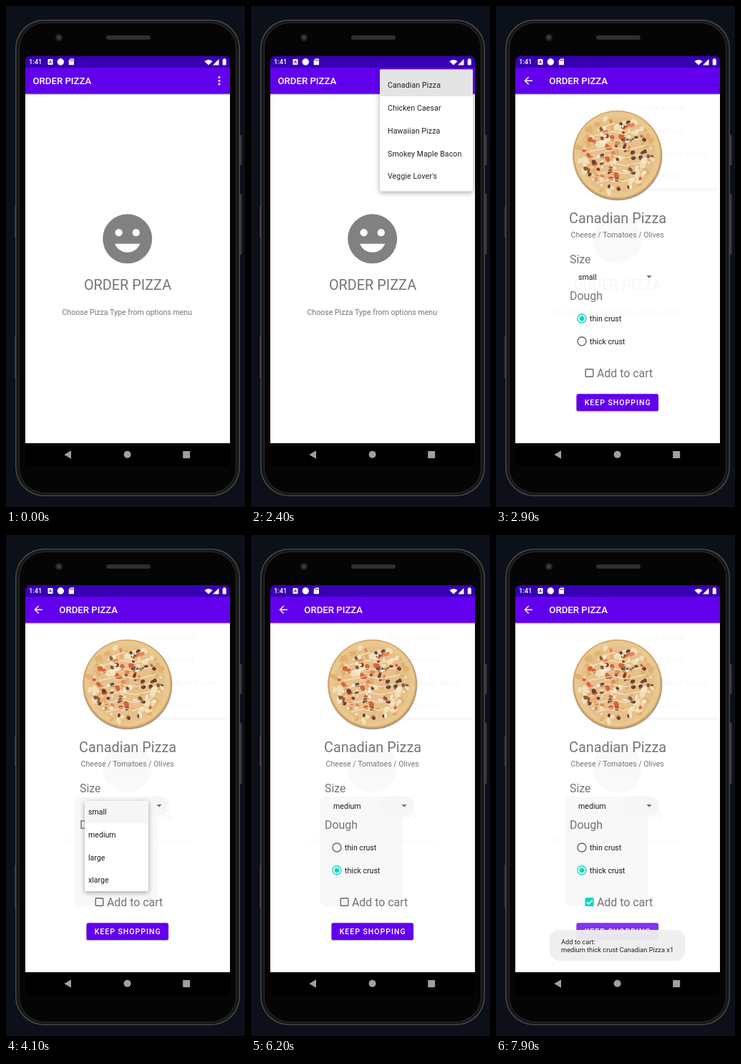
Recreate the animation shown at these times as an HTML page with a canvas. Size 334 by 699 pixels, loop 8 s.

```html
<!DOCTYPE html>
<html lang="en">
<head>
<meta charset="utf-8">
<title>Order Pizza</title>
<style>
html, body { margin: 0; width: 100%; height: 100%; overflow: hidden; background: #0c1019; }
canvas { display: block; width: 334px; height: 699px; font-family: Roboto, sans-serif; }
</style>
</head>
<body>
<canvas id="stage"></canvas>
<script>
const W = 334, H = 699, LOOP = 8000, TAU = Math.PI * 2;
const PURPLE = '#6200ee', DARK = '#3700b3', TEAL = '#10d6bf', GREY = '#757575';
const stage = document.getElementById('stage');
const c = stage.getContext('2d');
const dpr = window.devicePixelRatio || 1;
stage.width = W * dpr;
stage.height = H * dpr;

const seg = (t, a, b) => Math.min(1, Math.max(0, (t - a) / (b - a)));
const easeOut = p => 1 - (1 - p) * (1 - p);

function rect(x, y, w, h, color) {
  c.fillStyle = color;
  c.fillRect(x, y, w, h);
}

function round(x, y, w, h, r, color) {
  c.beginPath();
  c.roundRect(x, y, w, h, r);
  c.fillStyle = color;
  c.fill();
}

function disc(x, y, r, color) {
  c.beginPath();
  c.arc(x, y, r, 0, TAU);
  c.fillStyle = color;
  c.fill();
}

function poly(points, color) {
  c.beginPath();
  points.forEach(([x, y]) => c.lineTo(x, y));
  c.closePath();
  c.fillStyle = color;
  c.fill();
}

function line(points, color, width) {
  c.beginPath();
  points.forEach(([x, y]) => c.lineTo(x, y));
  c.strokeStyle = color;
  c.lineWidth = width;
  c.stroke();
}

// y is the middle of the capital letters
function text(str, x, y, size, color, { weight = 400, align = 'left', gap = 0 } = {}) {
  c.font = `${weight} ${size}px Roboto, sans-serif`;
  c.letterSpacing = gap + 'px';
  c.textAlign = align;
  c.fillStyle = color;
  c.fillText(str, x, y + size * 0.355);
}

function layer(alpha, draw) {
  if (alpha <= 0) return;
  c.save();
  c.globalAlpha *= alpha;
  draw();
  c.restore();
}

function zoom(scale, draw) {
  c.save();
  c.translate(170, 356);
  c.scale(scale, scale);
  c.translate(-170, -356);
  draw();
  c.restore();
}

function random(seed) {
  return () => {
    seed = (seed * 16807) % 2147483647;
    return seed / 2147483647;
  };
}

function phone() {
  rect(0, 0, W, H, '#0c1019');
  [[12, 280, 43], [12, 460, 60], [326, 180, 42], [326, 262, 85]].forEach(([x, y, h]) => {
    round(x, y, 3.5, h, 1, '#3b3b3d');
  });
  round(13, 19, 314, 665, 40, '#454547');
  round(14.5, 20.5, 311, 662, 39, '#161617');
  round(18, 23, 304, 657, 36, '#2b2b2c');
  round(19, 24, 302, 655, 35, '#050505');
  round(140, 41, 62, 6, 3, '#2f2f30');
  disc(74, 44, 5, '#232326');
  disc(74, 44, 2.4, '#3c3f48');
}

function frame(title, titleX) {
  rect(27, 70, 286, 16, DARK);
  rect(27, 86, 286, 524, '#fff');
  rect(27, 122, 286, 2, '#d9d9d9');
  rect(27, 86, 286, 36.7, PURPLE);
  rect(27, 610, 286, 32, '#000');
  text(title, titleX, 104.5, 13.2, '#fff', { weight: 500 });
}

function face(color) {
  c.save();
  c.translate(169.7, 324.8);
  c.scale(3.45, 3.45);
  disc(0, 0, 10, color);
  disc(-3.5, -2.5, 1.5, '#fff');
  disc(3.5, -2.5, 1.5, '#fff');
  c.fill(new Path2D('M0 5.5c2.33 0 4.31-1.46 5.11-3.5h-10.22c.8 2.04 2.78 3.5 5.11 3.5z'));
  c.restore();
}

function home() {
  frame('ORDER PIZZA', 37.5);
  [99.5, 104.3, 109].forEach(y => disc(298, y, 1.5, '#fff'));
  face('#818181');
  text('ORDER PIZZA', 170, 388.5, 19.86, GREY, { align: 'center' });
  text('Choose Pizza Type from options menu', 169.2, 427.3, 10.6, GREY, { align: 'center' });
}

const PIZZAS = ['Canadian Pizza', 'Chicken Caesar', 'Hawaiian Pizza', 'Smokey Maple Bacon', "Veggie Lover's"];
const SIZES = ['small', 'medium', 'large', 'xlarge'];

function card(x, y, w, h) {
  c.save();
  c.shadowColor = 'rgba(0,0,0,.35)';
  c.shadowBlur = 7 * dpr;
  c.shadowOffsetY = 2 * dpr;
  round(x, y, w, h, 2, '#fff');
  c.restore();
}

function menu(p, pressed) {
  const w = 130 * p, h = 170 * p;
  card(310 - w, 88.5, w, h);
  c.save();
  c.beginPath();
  c.rect(310 - w, 88.5, w, h);
  c.clip();
  rect(180, 88.5, 130, 37.5, pressed ? '#e4e4e4' : '#f6f6f6');
  PIZZAS.forEach((name, i) => text(name, 191, 110.5 + i * 31.8, 10.6, '#222', { gap: 0.1 }));
  c.restore();
}

function pizza() {
  const rnd = random(77);
  const spot = limit => {
    const a = rnd() * TAU, r = Math.sqrt(rnd()) * limit;
    return [Math.cos(a) * r, Math.sin(a) * r];
  };
  const blob = (limit, min, max, color) => {
    const [x, y] = spot(limit);
    c.beginPath();
    c.ellipse(x, y, min + rnd() * max, min + rnd() * max * 0.6, rnd() * 3, 0, TAU);
    c.fillStyle = color;
    c.fill();
  };
  c.save();
  c.translate(169.5, 207.8);
  disc(0.3, 1, 62.5, '#9b9290');
  disc(0, 0, 62, '#d7a362');
  disc(0, -0.5, 60, '#e9c88f');
  disc(0, 0, 53, '#e6c08a');
  for (let i = 0; i < 70; i++) blob(55, 2, 4, i % 2 ? '#f2dfb6' : '#e2b06f');
  for (let i = 0; i < 34; i++) blob(48, 1.8, 3, i % 3 ? '#d8623c' : '#e58757');
  for (let i = 0; i < 46; i++) blob(49, 1.6, 2.4, i % 3 ? '#6b4232' : '#8b5a40');
  for (let i = 0; i < 30; i++) blob(50, 1.2, 2.5, '#f5e7cc');
  c.lineCap = 'round';
  for (let i = 0; i < 8; i++) {
    const y = -42 + i * 11, half = Math.sqrt(50 * 50 - y * y) * 0.8;
    line([[-half, y + 4], [-half * 0.2, y - 2], [half * 0.3, y + 2], [half, y - 4]], 'rgba(255,248,235,.65)', 1.3);
  }
  c.restore();
}

// faint remains of the page before
function remains() {
  layer(0.03, () => {
    PIZZAS.slice(1).forEach((name, i) => text(name, 191, 142.3 + i * 31.8, 10.6, '#000', { weight: 500 }));
    text('ORDER PIZZA', 170, 388.5, 19.86, '#000', { align: 'center', weight: 500 });
    text('Choose Pizza Type from options menu', 169.2, 427.3, 10.6, '#000', { align: 'center' });
    rect(180, 254, 130, 4, '#000');
  });
  layer(0.025, () => face('#000'));
}

function radio(y, on, label) {
  c.beginPath();
  c.arc(120, y, 6, 0, TAU);
  c.strokeStyle = on > 0.5 ? TEAL : '#666';
  c.lineWidth = 1.4;
  c.stroke();
  if (on > 0) disc(120, y, 3.4 * on, TEAL);
  text(label, 131, y + 0.7, 10.6, '#1c1c1c');
}

function checkbox(p) {
  layer(1 - p, () => {
    c.strokeStyle = '#666';
    c.lineWidth = 1.4;
    c.beginPath();
    c.roundRect(125.2, 506.7, 10.6, 10.6, 1);
    c.stroke();
  });
  layer(p, () => {
    round(124.5, 506, 12, 12, 1.3, TEAL);
    line([[126.7, 512.2], [129.4, 514.9], [134.6, 509.4]], '#fff', 1.5);
  });
}

function button(press) {
  c.save();
  c.shadowColor = 'rgba(0,0,0,.3)';
  c.shadowBlur = 2 * dpr;
  c.shadowOffsetY = dpr;
  round(112.5, 541.3, 114.5, 23.7, 2.6, PURPLE);
  c.restore();
  text('KEEP SHOPPING', 123.7, 553.3, 10.6, '#fff', { weight: 500, gap: 0.945 });
  layer(press, () => round(112.5, 541.3, 114.5, 23.7, 2.6, '#fff'));
}

function sizeList(p, pressed) {
  const h = 126 * p;
  card(110, 371, 89, h);
  c.save();
  c.beginPath();
  c.rect(110, 371, 89, h);
  c.clip();
  rect(110, 371, 89, 31, '#f6f6f6');
  if (pressed) rect(110, 402, 89, 32, '#e4e4e4');
  SIZES.forEach((name, i) => text(name, 115, 386.3 + i * 31.8, 10.6, '#1c1c1c'));
  c.restore();
}

function order(t) {
  frame('ORDER PIZZA', 74.3);
  line([[51, 104.3], [40.5, 104.3]], '#fff', 1.4);
  line([[45.7, 99], [40.4, 104.3], [45.7, 109.6]], '#fff', 1.4);
  remains();
  if (t >= 3800) {
    const p = easeOut(seg(t, 3700, 4100));
    layer(p, () => {
      round(96, 365, 116, 153, 8, '#f8f8f8');
      round(180, 364.5, 48, 27, 13.5, '#f6f6f6');
    });
  }
  pizza();
  text('Canadian Pizza', 170, 296.3, 19.86, GREY, { align: 'center' });
  text('Cheese / Tomatoes / Olives', 169.7, 319, 10.6, GREY, { align: 'center' });
  text('Size', 103, 353.3, 15.9, GREY);
  text(t < 4900 ? 'small' : 'medium', 115, 378.3, 10.6, '#1c1c1c');
  poly([[210.3, 376], [217.7, 376], [214, 379.8]], GREY);
  text('Dough', 103, 404, 15.9, GREY);
  const thick = seg(t, 5800, 6200);
  radio(436, 1 - thick, 'thin crust');
  radio(467.8, thick, 'thick crust');
  checkbox(seg(t, 6500, 6800));
  text('Add to cart', 141, 512.8, 15.9, GREY);
  button(0.2 * seg(t, 7700, 7900));
  if (t >= 3800 && t < 5100) {
    const p = easeOut(seg(t, 3700, 4100));
    layer(p * (1 - seg(t, 4800, 5100)), () => sizeList(p, t >= 4800));
  }
}

function toast(alpha) {
  layer(alpha, () => {
    round(74.7, 551, 189.6, 43, 14, 'rgba(239,239,239,.95)');
    text('Add to cart:', 91, 567.3, 9.27, '#222');
    text('medium thick crust Canadian Pizza x1', 91, 578.3, 9.27, '#222');
  });
}

function wedge(x, y, r) {
  c.beginPath();
  c.moveTo(x, y);
  c.arc(x, y, r, -Math.PI * 0.76, -Math.PI * 0.24);
  c.closePath();
  c.fillStyle = '#fff';
  c.fill();
}

function systemBars() {
  rect(27, 70, 286, 15.7, DARK);
  text('1:41', 32, 78, 9.27, '#fff', { weight: 500 });
  round(58.5, 74, 7, 8, 1, '#fff');
  text('A', 62, 78, 6, DARK, { weight: 700, align: 'center' });
  disc(76.3, 78, 4.7, '#fff');
  poly([[90, 73.5], [95, 73.5], [95, 82.3], [87.7, 82.3], [87.7, 76]], '#fff');
  [89.8, 91.5, 93.2].forEach(x => rect(x, 74.8, 0.8, 2, DARK));
  wedge(283, 82.5, 7.6);
  poly([[289, 82.5], [297.5, 82.5], [297.5, 74]], '#fff');
  round(302.7, 74.2, 5, 8.3, 0.8, '#fff');
  rect(304.1, 73.2, 2.2, 1.2, '#fff');
  poly([[81.3, 626], [91, 620.3], [91, 631.7]], '#a0a0a0');
  disc(169.6, 625.8, 5, '#a0a0a0');
  round(247.2, 621, 10, 10, 0.8, '#a0a0a0');
}

function draw(t) {
  c.setTransform(dpr, 0, 0, dpr, 0, 0);
  phone();
  c.save();
  c.beginPath();
  c.roundRect(27, 70, 286, 572, 7);
  c.clip();
  rect(27, 70, 286, 572, '#000');
  const k = (t - 2500) / 100;
  if (t < 2500) {
    home();
  } else if (t < 2900) {
    zoom(1 + 0.06 * (1 - 0.55 ** (k + 1)), home);
    layer(k < 1 ? 0.6 : 1, () => zoom(1 - 0.07 / 3 ** k, () => order(t)));
  } else {
    order(t);
  }
  systemBars();
  if (t >= 1100 && t < 2600) {
    const p = easeOut(seg(t, 1000, 1400));
    layer(t < 2500 ? p : 0.4, () => menu(p, t >= 2400));
  }
  toast(seg(t, 6600, 7100));
  c.restore();
}

const start = performance.now();
function tick() {
  const t = (performance.now() - start) % LOOP;
  draw(Math.floor(t / 100) * 100);
  requestAnimationFrame(tick);
}
tick();
</script>
</body>
</html>
```
